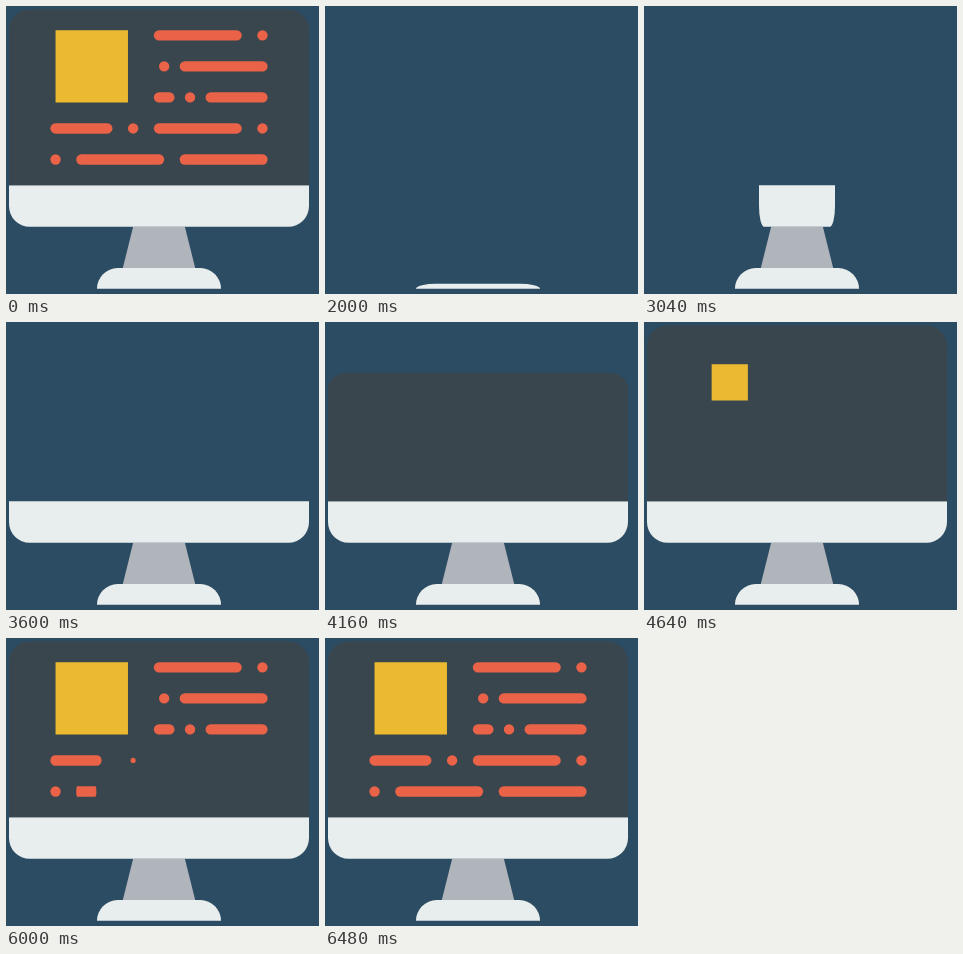
An HTML page with a canvas that plays this animation: 313x288 px, repeating every 8.56 s.

```html
<!DOCTYPE html>
<html lang="en">
<head>
<meta charset="utf-8">
<title>Monitor build-up</title>
<style>
html, body { margin: 0; width: 100%; height: 100%; overflow: hidden; background: #2c4c64; }
canvas { display: block; width: 313px; height: 288px; }
</style>
</head>
<body>
<canvas id="stage"></canvas>
<script>
const W = 313, H = 288, LOOP = 8560, STEP = 80, RESET = 2000;
const WHITE = '#e8eeed', GREY = '#b0b5bc', DARK = '#3a464e', YELLOW = '#ebba30', RED = '#ea6247';

// The drawing sits on a grid centred on the bottom edge of the screen.
const UNIT = 300 / 58, CX = 153, CY = 179.35;
const ROUND = 4, RIGHT = 21;

const canvas = document.getElementById('stage');
const ctx = canvas.getContext('2d');
const ratio = window.devicePixelRatio || 1;
canvas.width = W * ratio;
canvas.height = H * ratio;

// Each part grows linearly from its anchor (ax, ay) along the chosen axes.
const parts = [];
function part(start, length, axes, ax, ay, color, trace) {
  parts.push({ start, length, axes, ax, ay, color, trace });
}

function slab(width, top, bottom, radii) {
  return () => ctx.roundRect(-width / 2, top, width, bottom - top, radii);
}

function neck() {
  ctx.moveTo(-5, 8);
  ctx.lineTo(5, 8);
  ctx.lineTo(7, 16);
  ctx.lineTo(-7, 16);
}

const topRound = [ROUND, ROUND, 0, 0];
const bottomRound = [0, 0, ROUND, ROUND];
part(1920, 326, 'y', 0, 20, WHITE, slab(24, 16, 20, topRound));
part(2240, 610, 'y', 0, 16, GREY, neck);
part(2850, 750, 'x', 0, 0, WHITE, slab(58, 0, 8, bottomRound));
part(3920, 328, 'y', 0, 0, DARK, slab(58, -34, 0, topRound));
part(4320, 640, 'xy', -13, -23, YELLOW, () => ctx.rect(-20, -30, 14, 14));

// Lines of text, flush right: a width of 2 is a dot, anything wider a pill.
function layRow(widths, gap, row) {
  let x = RIGHT + gap;
  return widths.reverse().map(width => {
    x -= width + gap;
    return { x, width, y: row * 6 - 29 };
  });
}

const beside = [...layRow([17, 2], 3, 0), ...layRow([2, 17], 2, 1), ...layRow([4, 2, 12], 2, 2)];
const below = [...layRow([12, 2, 17, 2], 3, 3), ...layRow([2, 17, 17], 3, 4)];

// Marks of one kind appear from left to right.
function reveal(marks, start, gap, length) {
  marks.sort((a, b) => a.x - b.x || a.y - b.y).forEach(({ x, y, width }, i) => {
    const isDot = width === 2;
    part(start + i * gap, length, isDot ? 'xy' : 'x', isDot ? x + 1 : x, y, RED,
      () => ctx.roundRect(x, y - 1, width, 2, 1));
  });
}

const dots = marks => marks.filter(m => m.width === 2);
const pills = marks => marks.filter(m => m.width > 2);
reveal(dots(beside), 4960, 80, 160);
reveal(pills(beside), 5230, 143, 240);
reveal(dots(below), 5760, 160, 160);
reveal(pills(below), 5802, 143, 240);

function draw(time) {
  ctx.setTransform(ratio, 0, 0, ratio, 0, 0);
  ctx.fillStyle = '#2c4c64';
  ctx.fillRect(0, 0, W, H);
  ctx.translate(CX, CY);
  ctx.scale(UNIT, UNIT);
  for (const p of parts) {
    const grown = time < RESET ? 1 : Math.min(1, (time - p.start) / p.length);
    if (grown <= 0) continue;
    ctx.save();
    ctx.translate(p.ax, p.ay);
    ctx.scale(p.axes.includes('x') ? grown : 1, p.axes.includes('y') ? grown : 1);
    ctx.translate(-p.ax, -p.ay);
    ctx.beginPath();
    p.trace();
    ctx.fillStyle = p.color;
    ctx.fill();
    ctx.restore();
  }
}

const origin = performance.now();
function tick() {
  const time = (performance.now() - origin) % LOOP;
  draw(Math.floor(time / STEP) * STEP);
  requestAnimationFrame(tick);
}
tick();
</script>
</body>
</html>
```
